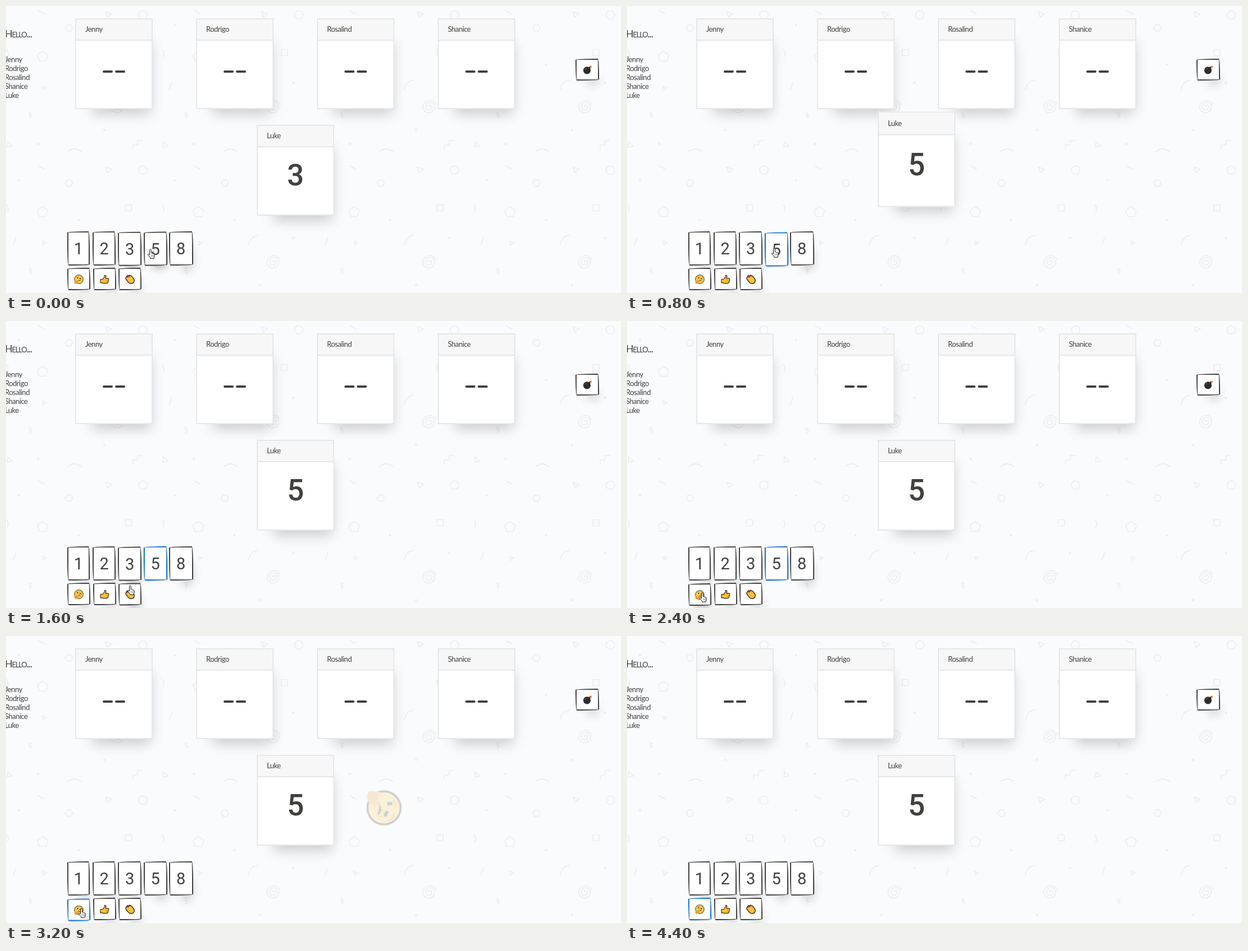
An HTML page for the animation above (4.8 s loop, 1094x512 px).

```html
<!DOCTYPE html>
<html lang="en">
<head>
<meta charset="utf-8">
<title>Planning cards</title>
<style>
html, body { margin: 0; width: 100%; height: 100%; overflow: hidden; background: #fafbfd; }
body { position: relative; color: #41403e; font: 13px/16px Lato, "Open Sans", sans-serif; letter-spacing: -.5px; }
#stage { position: absolute; left: 0; top: 0; width: 1094px; height: 512px; overflow: hidden; }
#stage > * { position: absolute; box-sizing: border-box; }
svg { display: block; }
.card { width: 138px; height: 162px; background: #fff; border: 2px solid #e6e7e9;
  box-shadow: 13px 25px 23px -17px rgba(0,0,0,.2); transform-origin: center bottom; }
.card > * { position: absolute; box-sizing: border-box; }
.name { left: 0; top: 0; width: 134px; height: 38px; padding-left: 16px; line-height: 35px;
  background: #f7f7f7; border-bottom: 2px solid #e6e7e9; }
.vote { left: 0; top: 58px; width: 134px; height: 60px; text-align: center;
  font: 500 53px/60px Roboto, sans-serif; letter-spacing: 0; }
.dash { top: 91px; width: 18px; height: 4px; border-radius: 2px; background: #41403e; }
.btn { display: flex; align-items: center; justify-content: center; background: #fff;
  border: 2px solid #41403e; border-radius: 255px 15px 225px 15px / 15px 225px 15px 255px;
  font: 29px Roboto, sans-serif; letter-spacing: 0; }
h1 { left: -2px; top: 38px; margin: 0; font: small-caps 18px/22px Lato, sans-serif; letter-spacing: -1.2px; white-space: nowrap; }
.list { left: -2px; top: 87px; }
</style>
</head>
<body>
<svg width="0" height="0" style="position:absolute">
  <defs>
    <pattern id="doodles" width="277.2" height="277" patternUnits="userSpaceOnUse">
      <g fill="none" stroke="#ebedf0" stroke-width="1.7">
        <circle cx="243.5" cy="16" r="7.5"/>
        <path d="M105.5 39l3.2-5.6h6.6l3.2 5.6-3.2 5.6h-6.6z"/>
        <path d="M65 80.5l9.5 7-3.6 11h-11.8l-3.6-11z"/>
        <path d="M212.5 77.5h11v11h-11z"/>
        <path d="M.5 77q6 6 1.5 14M13 150l5-14M57 8l11 6"/>
        <path d="M64.5 143l7 2.5-5.5 4.5zM177.5 10.5l10.5 3.5-7.5 6zM3 242l8 8-9 2z"/>
        <path d="M154 150q3-17 18-18M110 260q12-10 24 0"/>
        <path d="M243 240h-9v8h-8.5v8"/>
        <path d="M197 180a3 3 0 0 1 6 0a5.5 5.5 0 0 1-11 0a8 8 0 0 1 16 0a10.5 10.5 0 0 1-21 0a12.5 12.5 0 0 1 24-4"/>
        <path d="M40 190l5 2-4 3 5 2-4 4"/>
      </g>
      <g fill="#ebedf0">
        <circle cx="175" cy="221" r="2"/><circle cx="57" cy="246" r="2"/><circle cx="234" cy="137" r="2"/>
        <circle cx="129" cy="105" r="2"/><circle cx="23" cy="34" r="2"/>
      </g>
    </pattern>
    <symbol id="think" viewBox="0 0 64 64">
      <circle cx="32" cy="32" r="29.5" fill="#ffc94d" stroke="#2b2a29" stroke-width="3.6"/>
      <g fill="none" stroke-linecap="round">
        <path d="M19 15q5-4 11-2M43 15q9 0 12 8" stroke="#e29b22" stroke-width="3.6"/>
        <path d="M24 20l.6 4M40 27l5 2" stroke="#2b2a29" stroke-width="6"/>
        <path d="M23 42q10-6 19-1" stroke="#2b2a29" stroke-width="3.5"/>
      </g>
      <path d="M4 38q4-4 6 3l2 3 15-5q5 0 3 4l-7 3q8-1 8 3l-6 2q2 9-8 11-10 2-15-4z" fill="#e2a02c"/>
    </symbol>
    <symbol id="thumb" viewBox="0 0 64 64">
      <path d="M4 32h15l11-15 2-12q9-1 9 9l-3 12h16q7 1 5 8l-5 20q-2 5-8 5H22l-6-3H4z" fill="#ffc02e" stroke="#2b2a29" stroke-width="4.5" stroke-linejoin="round"/>
      <path d="M40 38h18M39 48h15" stroke="#d18d1c" stroke-width="3"/>
    </symbol>
    <symbol id="clap" viewBox="0 0 64 64">
      <path d="M5 20L14 7l8 1 8-4 14 8 14 18q6 10 1 20-7 11-20 11-11 0-18-9L6 33q-4-6-1-13z" fill="#ffbe38" stroke="#2b2220" stroke-width="5" stroke-linejoin="round"/>
      <path d="M11 19l9-9M20 18l10-9" stroke="#8c3a1e" stroke-width="5" stroke-linecap="round"/>
    </symbol>
    <symbol id="bomb" viewBox="0 0 64 64">
      <path d="M42 20l10-10" stroke="#8a4b2a" stroke-width="6"/>
      <path d="M48 4l5 4 7-4-2 8 4 6-8-1-6 5z" fill="#e8663c"/>
      <circle cx="28" cy="37" r="25" fill="#2d2c2c"/>
      <path d="M34 17l9-5 9 10-5 8z" fill="#2d2c2c"/>
      <path d="M13 34q3-10 12-12" fill="none" stroke="#666" stroke-width="4"/>
    </symbol>
  </defs>
</svg>
<div id="stage">
  <svg width="1094" height="512" style="left:0;top:0"><rect width="1094" height="512" fill="url(#doodles)"/></svg>
  <h1>Hello...</h1>
  <div class="list"></div>
</div>
<script>
const LOOP = 4800, STEP = 200;
const VOTE = 600, REACT = 2600;   // click times
const FADE = 235;                 // hover transition
const stage = document.getElementById('stage');
const people = ['Jenny', 'Rodrigo', 'Rosalind', 'Shanice', 'Luke'];

function add(parent, cls, html, box = []) {
  const el = document.createElement('div');
  el.className = cls;
  el.innerHTML = html;
  ['left', 'top', 'width', 'height'].forEach((k, i) => {
    if (box[i] !== undefined) el.style[k] = box[i] + 'px';
  });
  parent.appendChild(el);
  return el;
}
const icon = (id, size) => `<svg width="${size}" height="${size}"><use href="#${id}"/></svg>`;

stage.querySelector('.list').innerHTML = people.join('<br>');

const cards = people.map((name, i) => {
  const mine = i === 4;
  const card = add(stage, 'card', '', mine ? [446, 212] : [123 + i * 215, 22]);
  add(card, 'name', name);
  if (!mine) [47, 69].forEach(x => add(card, 'dash', '', [x]));
  return card;
});
const myCard = cards[4];
const vote = add(myCard, 'vote', '3');

const buttons = [];
function button(id, html, x, y, w, h) {
  buttons.push({ id, x, y, w, h, style: add(stage, 'btn', html, [x, y, w, h]).style });
}
['1', '2', '3', '5', '8'].forEach((n, i) => button(n, n, 109 + 45.2 * i, 402, 40 + .7 * i, 61));
['think', 'thumb', 'clap'].forEach((id, i) => button(id, icon(id, 17), 109 + 45.5 * i, 467, 41, 40));
button('bomb', icon('bomb', 17), 1013, 94, 42, 39);

const flyer = add(stage, '', icon('think', 64), [0, 0, 64, 64]);
const hand = add(stage, '', `<svg width="15" height="19" viewBox="-.5 -.5 15 19">
  <path d="M4 10.5V2a1.4 1.4 0 0 1 2.8 0v5l1.7.2.4.6 1.6.2.4.6 1.4.3.4.8v3.6l-1 2.2v1.2H5.2v-1.5L1 10.6c-.6-1.3.8-2 1.7-1.1z"
  fill="#fff" stroke="#111" stroke-linejoin="round"/><path d="M7 10v4M9 10v4M10.8 10v4" stroke="#444" stroke-width=".6"/></svg>`, [0, 0]);

const mix = (a, b, p) => a.map((v, i) => v + (b[i] - v) * p);

// Way points of the pointer: time, x, y
const route = [[-200, 222, 444], [40, 257, 431], [1000, 256, 431], [1600, 215, 471],
  [2400, 128, 484], [3800, 128, 485], [4100, 107, 508]];
const LEAVE = route[route.length - 1][0];

function pointer(t) {
  const i = Math.max(1, route.findIndex(k => k[0] > t));
  const a = route[i - 1], b = route[i];
  return mix(a, b, (t - a[0]) / (b[0] - a[0])).slice(1);
}

function touches(b, t) {
  if (t >= LEAVE) return false;
  const [x, y] = pointer(t), dx = x + 5 - b.x, dy = y - b.y;
  return dx >= 0 && dx < b.w && dy >= 0 && dy < b.h;
}

// Share of the transition time spent under the pointer, eased
function hover(b, t) {
  const n = 12;
  let hits = 0;
  for (let i = 0; i < n; i++) hits += touches(b, t - FADE * i / n);
  const p = hits / n;
  return p * p * (3 - 2 * p);
}

// Shadow: x, y, blur, spread, alpha
const REST = [10, 19, 17, -12, .2], HOVER = [1.3, 5.3, 5.3, -3.3, .3], FOCUS = [1.3, 5.3, 2.7, -4, .3];

function paintButton(b, t, focused) {
  const p = hover(b, t);
  const [x, y, blur, spread, alpha] = focused ? FOCUS : mix(REST, HOVER, p);
  b.style.transform = `translateY(${1.5 * p}px)`;
  b.style.boxShadow = `${x}px ${y}px ${blur}px ${spread}px rgba(0,0,0,${alpha})`;
  b.style.borderColor = focused ? '#1579d8' : '#41403e';
  b.style.outline = focused ? '1px dotted #a9b4c0' : 'none';
}

function draw(now) {
  const t = Math.floor((now % LOOP) / STEP) * STEP;
  const focus = t < VOTE ? '' : t < REACT ? '5' : 'think';
  buttons.forEach(b => paintButton(b, t, b.id === focus));

  vote.textContent = t < VOTE ? '3' : '5';
  const u = (t - VOTE + 40) / 860;
  const jump = u > 0 && u < 1 ? Math.sin(Math.PI * u) ** 2 : 0;
  myCard.style.transform = `translateY(${-26 * jump}px) scaleY(${1 + .085 * jump})`;

  const f = (t - REACT - 200) / 450, out = 1 - (1 - f) ** 2;
  flyer.style.display = f >= 0 && f < 1 ? 'block' : 'none';
  flyer.style.transform = `translate(${516 + 126 * out}px,${224 + 57 * f}px) rotate(${92 * out}deg)`;
  flyer.style.opacity = 1 - .81 * out;

  hand.style.display = t < LEAVE ? 'block' : 'none';
  if (t < LEAVE) {
    const [x, y] = pointer(t).map(Math.round);
    hand.style.transform = `translate(${x}px,${y}px)`;
  }
}

const start = performance.now();
function tick() {
  draw(performance.now() - start);
  requestAnimationFrame(tick);
}
tick();
</script>
</body>
</html>
```
